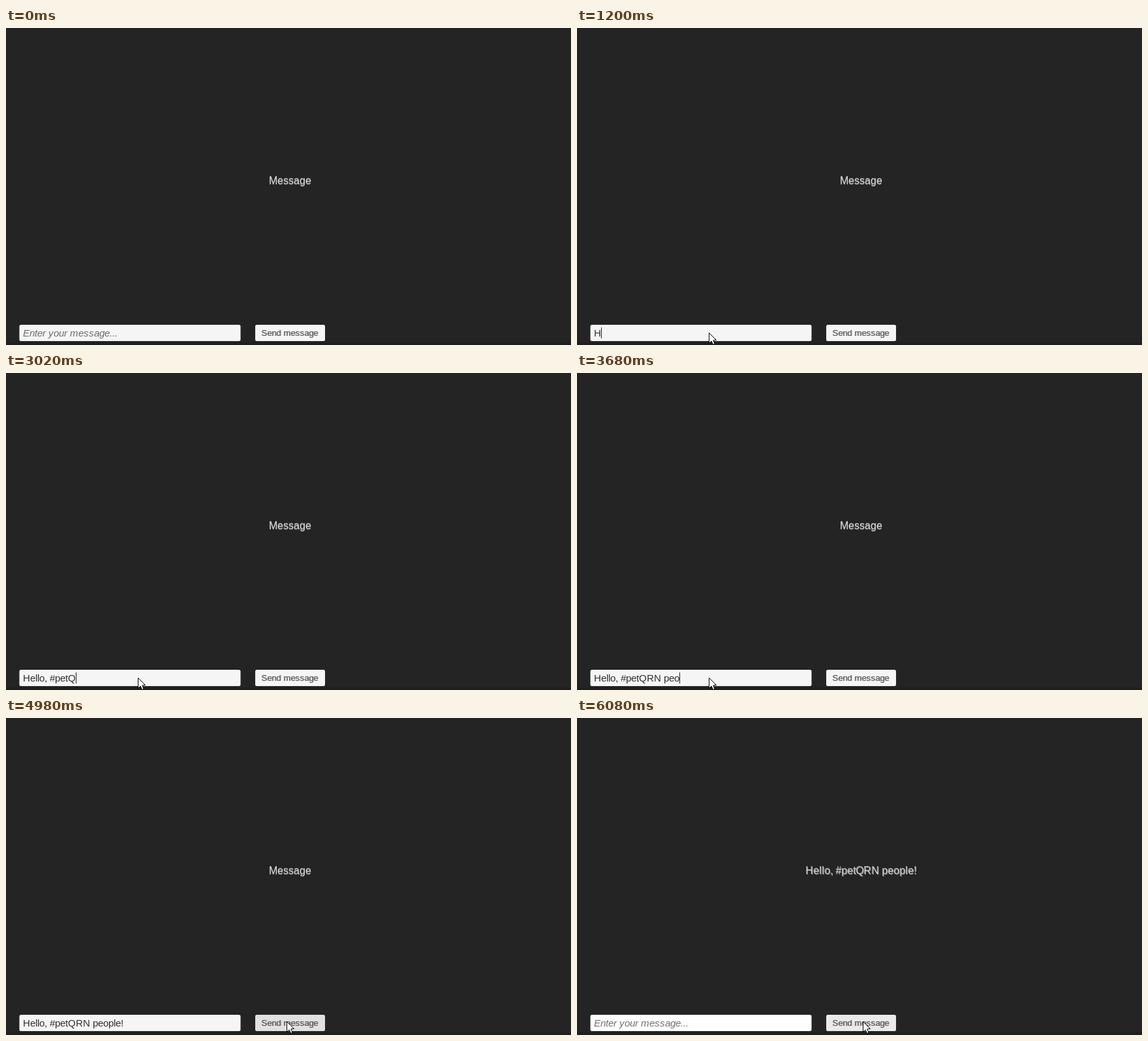
An HTML page with a canvas for the animation above (7610 ms loop, 866 by 486 pixels).

```html
<!DOCTYPE html>
<html lang="en">
<head>
<meta charset="utf-8">
<title>Send message</title>
<style>
html, body { margin: 0; width: 100%; height: 100%; overflow: hidden; background: #242424; }
canvas { display: block; }
</style>
</head>
<body>
<canvas id="stage" width="866" height="486"></canvas>
<script>
const ctx = document.getElementById('stage').getContext('2d');
const LOOP = 7610;
const TICK = 92; // the screen refreshes in steps of this many ms
const FONT = '"Liberation Sans", Arial, sans-serif';
const TEXT = 'Hello, #petQRN people!';

// Moments, in ticks
const ENTER = 2, PRESS = 4, FOCUS = 5, BLINK = 12, LEAVE = 52, HOVER = 53, CLICK = 55, SENT = 56;

// Key points [tick, value]: bursts of typing and strokes of the mouse
const typing = [[12, 0], [13, 1], [17, 5], [37, 15], [43, 21], [45, 22]];
const mouseX = [[2, 206], [3, 202], [48, 202], [50, 215], [51, 215], [54, 430],
  [57, 430], [60, 426], [63, 426], [66, 438]];
const mouseY = [[2, 475], [3, 467], [51, 467], [54, 465]];

function follow(keys, k) {
  const i = keys.findIndex(([at]) => at > k);
  if (i === 0) return keys[0][1];
  if (i < 0) return keys[keys.length - 1][1];
  const [k0, v0] = keys[i - 1], [k1, v1] = keys[i];
  return v0 + (v1 - v0) * (k - k0) / (k1 - k0);
}

// How far a control is pressed: fades in and out around its peak
const pressed = (k, peak) => Math.max(0, 1 - Math.abs(k - peak) / 1.8);

// Glyphs sit on whole pixels, so every advance is rounded.
const advance = ch => Math.round(ctx.measureText(ch).width + 0.01);
const widthOf = str => [...str].reduce((sum, ch) => sum + advance(ch), 0);

function setFont(size, style = '') {
  ctx.font = `${style} ${size}px ${FONT}`;
}

function drawText(str, x, y, color) {
  ctx.fillStyle = color;
  for (const ch of str) {
    ctx.fillText(ch, x, y);
    x += advance(ch);
  }
  return x;
}

// Centered labels fall between pixels, so they blend the two nearest positions.
function drawLabel(str, cx, y, color) {
  const x = cx - widthOf(str) / 2;
  ctx.globalAlpha = 0.6;
  for (const snap of [Math.floor, Math.ceil]) drawText(str, snap(x), snap(y), color);
  ctx.globalAlpha = 1;
}

function drawBox(x, y, w, h, level) {
  ctx.fillStyle = `rgb(${level},${level},${level})`;
  ctx.beginPath();
  ctx.roundRect(x, y, w, h, 2.5);
  ctx.fill();
}

function drawCursor(x, y) {
  const points = [[0, 0], [0, 16], [3.5, 12.5], [6.2, 18], [8.5, 17], [6.3, 11.3], [11, 11]];
  ctx.beginPath();
  for (const [px, py] of points) ctx.lineTo(x + px + 0.5, y + py + 0.5);
  ctx.closePath();
  ctx.fillStyle = '#fff';
  ctx.fill();
  ctx.strokeStyle = '#000';
  ctx.lineWidth = 1;
  ctx.stroke();
}

function drawInput(k) {
  const sent = k >= SENT;
  const count = sent ? 0 : Math.floor(follow(typing, k) + 1e-6);
  drawBox(20.5, 455, 339, 25, sent ? 255 : 245 - 45 * pressed(k, PRESS));

  let caretX = 26;
  if (count) {
    setFont(15);
    caretX = drawText(TEXT.slice(0, count), caretX, 473, '#303030');
  } else {
    setFont(15, 'italic');
    drawText('Enter your message...', caretX, 473, 'rgba(50,50,50,0.7)');
  }
  if (k >= FOCUS && k < LEAVE && k !== BLINK) {
    ctx.fillStyle = '#222';
    ctx.fillRect(caretX, 459, 1, 17);
  }
}

function drawButton(k) {
  drawBox(382, 455, 107, 25, (k < HOVER ? 245 : 234) - 20 * pressed(k, CLICK));
  setFont(13);
  drawLabel('Send message', 435, 472, '#323232');
}

function draw(t) {
  const k = Math.floor((t + 8) / TICK);

  ctx.fillStyle = '#242424';
  ctx.fillRect(0, 0, 866, 486);
  ctx.fillStyle = '#1f1f1f';
  ctx.fillRect(0, 482, 866, 4);

  setFont(16);
  drawLabel(k < SENT ? 'Message' : TEXT, 435.5, 239.5, '#fff');
  drawInput(k);
  drawButton(k);
  if (k >= ENTER) drawCursor(Math.round(follow(mouseX, k)), Math.round(follow(mouseY, k)));
}

const begin = performance.now();
function tick() {
  draw((performance.now() - begin) % LOOP);
  requestAnimationFrame(tick);
}
tick();
</script>
</body>
</html>
```
